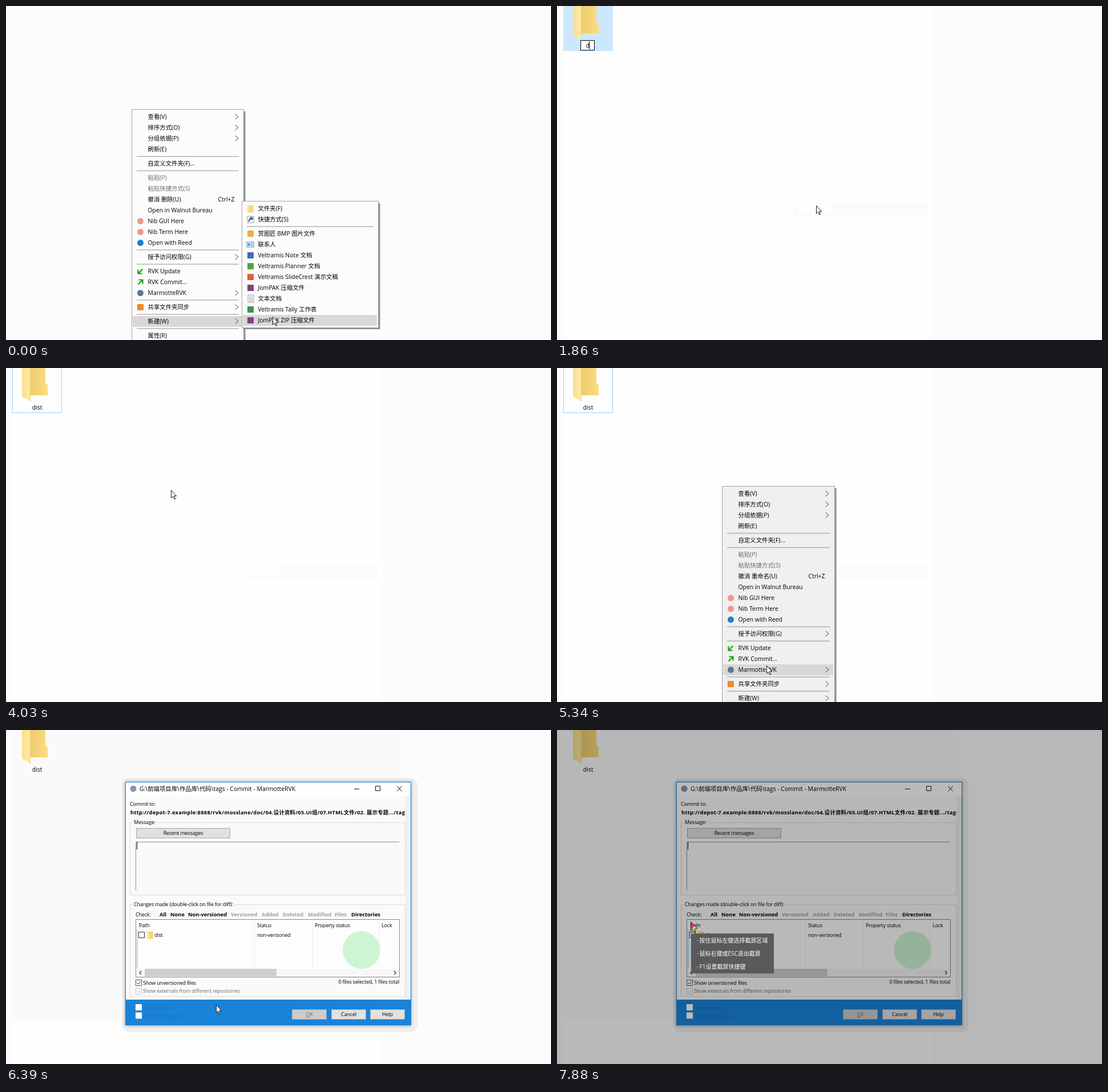
Recreate the animation shown at these times as an HTML page. Size 955x586 px, loop 8 s.

```html
<!DOCTYPE html>
<html lang="zh-CN">
<head>
<meta charset="utf-8">
<title>Folder commit</title>
<style>
  html, body { margin: 0; width: 100%; height: 100%; overflow: hidden; background: #fcfcfc; }
  svg { display: block; width: 955px; height: 586px; }
  text { font: 10.4px 'Open Sans', 'Noto Sans CJK SC', 'Noto Sans CJK', sans-serif; fill: #000; white-space: pre; }
  .ui { font-size: 9px; letter-spacing: -.17px; }
  .bold { font-size: 9.3px; font-weight: 700; }
  .url { letter-spacing: .3px; }
  .off { fill: #6d6d6d; }
  .pale { fill: #a0a0a0; }
  .tip { font-size: 10px; fill: #fff; }
  .mid { text-anchor: middle; }
  .end { text-anchor: end; }
</style>
</head>
<body>
<svg id="stage" viewBox="0 0 955 586"></svg>
<script>
const LOOP = 8000;

// ---- drawing helpers ----
const rect = (x, y, w, h, fill, more = '') =>
  `<rect x="${x}" y="${y}" width="${w}" height="${h}" fill="${fill}" ${more}/>`;
const frame = (x, y, w, h, stroke, fill = 'none', more = '') =>
  rect(x + .5, y + .5, w - 1, h - 1, fill, `stroke="${stroke}" ${more}`);
const path = (d, stroke, fill = 'none', more = '') =>
  `<path d="${d}" stroke="${stroke}" fill="${fill}" ${more}/>`;
const text = (x, y, s, cls = '', more = '') =>
  `<text x="${x}" y="${y + (/ui|bold|tip/.test(cls) ? 3.3 : 3.7)}" class="${cls}" ${more}>${s}</text>`;
const group = (id, body, more = '') => `<g id="${id}" ${more}>${body}</g>`;

const glyphs = {
  update: (x, y) => path(`M${x + 4} ${y - 4}L${x - 3} ${y + 3}M${x - 4} ${y - 3}V${y + 4}H${x + 3}`, '#1f9a12', 'none', 'stroke-width="2.2"'),
  commit: (x, y) => path(`M${x - 4} ${y + 4}L${x + 3} ${y - 3}M${x - 3} ${y - 4}H${x + 4}V${y + 3}`, '#1f9a12', 'none', 'stroke-width="2.2"'),
  folder: (x, y) => rect(x - 6, y - 6, 11, 13, '#f7d77c') + rect(x - 6, y - 6, 3, 13, '#ffe9a6'),
  link: (x, y) => frame(x - 6, y - 6, 12, 12, '#9a9a9a', '#fff') +
    path(`M${x - 3} ${y + 4}Q${x - 3} ${y - 1} ${x + 2} ${y - 1}M${x - 1} ${y - 3}H${x + 3}V${y + 1}`, '#1d4f9c', 'none', 'stroke-width="1.8"'),
  card: (x, y) => frame(x - 7, y - 5, 13, 10, '#5a8fc4', '#e6f2fc') + rect(x - 5, y - 2, 4, 4, '#4d8ac6') +
    rect(x, y - 2, 4, 1, '#4d8ac6') + rect(x, y + 1, 4, 1, '#4d8ac6'),
  page: (x, y) => frame(x - 5, y - 7, 11, 14, '#9a9a9a', '#fff') +
    [-4, -2, 0, 2, 4].map(d => rect(x - 3, y + d, 7, 1, '#b0b0b0')).join('')
};
const icon = (name, x, y) => {
  if (!name) return '';
  if (glyphs[name]) return glyphs[name](x, y);
  const color = name.slice(1);
  return name[0] === 'o' ? `<circle cx="${x}" cy="${y}" r="5.5" fill="${color}"/>` : rect(x - 5.5, y - 5.5, 11, 11, color);
};

// Rows are [label, icon, mark]; mark is '>' for a submenu, '-' for disabled, else a shortcut. 0 is a rule.
function menu(id, x, y, w, h, bg, rows) {
  let top = y + 4, body = '';
  for (const row of rows) {
    if (!row) {
      body += rect(x + 9, top + 2.5, w - 18, 1, '#919191');
      top += 6;
      continue;
    }
    const [label, pic, mark] = row, mid = top + 9.5;
    body += icon(pic, x + 15.5, mid) + text(x + 28.5, mid, label, mark === '-' ? 'off' : '');
    if (mark === '>') body += path(`M${x + 181.5} ${mid - 5}l5.5 4.7l-5.5 4.7`, '#40406c');
    else if (mark && mark !== '-') body += text(x + 180.5, mid, mark, 'end');
    top += 19;
  }
  return group(id, rect(x + 2.5, y + 4, w, h - 2, '#8f8f8f') + frame(x, y, w, h, '#a3a3a3', bg) +
    rect(x + 2, 0, w - 5, 19, '#d8d8d8', `id="${id}Hover"`) + body);
}

const mainRows = undone => [
  ['查看(V)', '', '>'], ['排序方式(O)', '', '>'], ['分组依据(P)', '', '>'], ['刷新(E)'], 0,
  ['自定义文件夹(F)...'], 0,
  ['粘贴(P)', '', '-'], ['粘贴快捷方式(S)', '', '-'], [`撤消 ${undone}(U)`, '', 'Ctrl+Z'],
  ['Open in Walnut Bureau'], ['Nib GUI Here', 'o#ee9a86'], ['Nib Term Here', 'o#ee9a86'],
  ['Open with Reed', 'o#1f7ec8'], 0,
  ['授予访问权限(G)', '', '>'], 0,
  ['RVK Update', 'update'], ['RVK Commit...', 'commit'], ['MarmotteRVK', 'o#5d7896', '>'], 0,
  ['共享文件夹同步', 's#ee8a32', '>'], 0, ['新建(W)', '', '>'], 0, ['属性(R)']
];
const newRows = [
  ['文件夹(F)', 'folder'], ['快捷方式(S)', 'link'], 0,
  ['赏图匠 BMP 图片文件', 's#eeb045'], ['联系人', 'card'],
  ['Veltramis Note 文档', 's#3f6fb5'], ['Veltramis Planner 文档', 's#56a046'],
  ['Veltramis SlideCrest 演示文稿', 's#dc6239'], ['JomPAK 压缩文件', 's#85407e'],
  ['文本文档', 'page'], ['Veltramis Tally 工作表', 's#3f9155'], ['JomPAK ZIP 压缩文件', 's#85407e']
];

const folder = () =>
  rect(11, -2, 87, 81, '#cce8ff', 'id="fill"') + frame(11, -2, 87, 81, '#99d1ff', 'none', 'id="outline"') +
  path('M40 0H69V27L73 30V48H40Z', 'none', 'url(#body)') + path('M28 0H41L43 4V59L28 50Z', 'none', 'url(#flap)') +
  text(54.5, 69, 'dist', 'mid', 'id="label"') +
  group('edit', frame(20, 60, 68, 18, '#000', '#fff', 'id="editBox"') + rect(28, 62, 52, 14, '#0078d7', 'id="editSel"') +
    text(54, 69, '', 'mid', 'id="editText"') + rect(79, 62, 1, 14, '#000', 'id="caret"'));

// ---- commit window ----
const groupBox = (y, h, label, w) => frame(217, y, 483, h, '#dcdcdc') + rect(222, y - 1, w, 3, '#fafafa') + text(224, y, label, 'ui');
const check = (x, y, stroke, tick) => frame(x, y, 11, 11, stroke, '#fff') +
  (tick ? path(`M${x + 2.5} ${y + 5.5}l2.3 2.5l4.2 -5`, tick) : '');
const button = (x, y, w, h, label, fill = '#e1e1e1', cls = '') =>
  frame(x, y, w, h, '#a8a8a8', fill) + text(x + w / 2, y + h / 2, label, 'ui mid ' + cls);

function commitWindow() {
  const filters = [[269, 'All'], [288, 'None'], [319, 'Non-versioned'], [394, 'Versioned', 1], [448, 'Added', 1],
    [485, 'Deleted', 1], [529, 'Modified', 1], [576, 'Files', 1], [605, 'Directories']];
  return rect(203, 84, 518, 446, '#efefef', 'rx="13"') + rect(209, 91, 501, 428, '#999', 'filter="url(#soft)"') +
    frame(209, 91, 501, 427, '#1883d7', '#fafafa') + rect(210, 92, 499, 24, '#fff') +
    rect(700, 116, 9, 357, '#f0f0f0') + rect(209, 473, 501, 45, '#1883d9') +
    '<circle cx="223" cy="103" r="5.5" fill="#8295b4"/>' +
    text(234, 103, 'G:\\前端项目库\\作品库\\代码\\tags - Commit - MarmotteRVK') +
    path('M610 103.5h9M647.5 98.5h8v8h-8zM685.5 98.5l8 9M693.5 98.5l-8 9', '#111') +
    text(217, 130, 'Commit to:', 'ui') +
    `<g clip-path="url(#urlClip)">${text(218, 145, 'http://depot-7.example:8888/rvk/mosslane/doc/04.设计资料/05.UI组/07.HTML文件/02. 展示专题.../tags', 'bold url')}</g>` +
    groupBox(162, 128, 'Message:', 42) + button(228, 172, 165, 18, 'Recent messages') +
    group('ghosts', rect(229, 196, 206, 86, '#fff') + rect(227, 282, 208, 38, '#f0f0f0')) +
    path('M227.5 281V196.5H689', '#8c8c8c') + rect(229, 196.5, 1, 13, '#000', 'id="msgCaret"') +
    groupBox(306, 162, 'Changes made (double-click on file for diff):', 177) + text(227, 324, 'Check:', 'ui') +
    filters.map(([x, s, off]) => text(x, 324, s, off ? 'bold pale' : 'bold')).join('') +
    frame(227, 332, 463, 102, '#828790', '#fdfdfd') + rect(228, 333, 207, 17, '#e5f3ff', 'id="headHover"') +
    [435, 536, 653].map(x => rect(x, 333, 1, 85, '#e3f1f0')).join('') + rect(229.5, 350, 1, 68, '#75b9e8') +
    '<circle cx="623" cy="386" r="33" fill="#cdf4d4"/>' +
    [[233, 'Path'], [440, 'Status'], [541, 'Property status'], [658, 'Lock']].map(([x, s]) => text(x, 343, s, 'ui')).join('') +
    check(232, 354, '#333') + glyphs.folder(253, 359.5) + text(260, 360, 'dist', 'ui') + text(440, 360, 'non-versioned', 'ui') +
    rect(228, 419, 461, 14, '#f7f7f7') + rect(243, 419, 231, 13, '#cdcdcd') +
    path('M237 422.5l-3 3.2l3 3.2M680 422.5l3 3.2l-3 3.2', '#444', 'none', 'stroke-width="1.4"') +
    check(227, 438, '#555', '#222') + frame(227, 438, 11, 11, '#0078d7', 'none', 'id="checkHover"') +
    text(240, 444, 'Show unversioned files', 'ui') + text(689, 442, '0 files selected, 1 files total', 'ui end') +
    check(227, 453, '#c4c4c4', '#aaa') + text(240, 458, 'Show externals from different repositories', 'ui off') +
    rect(227, 481, 11, 11, '#fff') + rect(227, 495.5, 11, 11, '#fff') +
    text(244, 487, 'Keep locks', 'ui', 'style="fill:#2a6fa8"') + text(244, 502, 'Keep changelists', 'ui', 'style="fill:#2a6fa8"') +
    button(501, 490, 61, 18, '<tspan text-decoration="underline">O</tspan>K', '#cccccc', 'off') +
    button(570, 490, 61, 18, 'Cancel') + button(638, 490, 61, 18, 'Help');
}

const arrow = 'M.5 .5V14L3.6 11.2L5.8 16.3L7.8 15.4L5.6 10.5H9.7Z';
const tips = ['按住鼠标左键选择截屏区域', '鼠标右键或ESC退出截屏', 'F1设置截屏快捷键'];

document.getElementById('stage').innerHTML = `<defs>
  <linearGradient id="body"><stop stop-color="#eccb6c"/><stop offset="1" stop-color="#fbdc80"/></linearGradient>
  <linearGradient id="flap"><stop stop-color="#f9df8c"/><stop offset=".8" stop-color="#ffe9a2"/><stop offset="1" stop-color="#f6d67c"/></linearGradient>
  <linearGradient id="rainbow" x2=".8" y2="1"><stop offset=".3" stop-color="#f0208c"/><stop offset=".3" stop-color="#e020e0"/>
    <stop offset=".5" stop-color="#e020e0"/><stop offset=".5" stop-color="#ffee20"/><stop offset=".75" stop-color="#ffee20"/><stop offset=".75" stop-color="#30d060"/></linearGradient>
  <filter id="soft"><feGaussianBlur stdDeviation="2.5"/></filter>
  <clipPath id="urlClip"><rect x="217" y="136" width="483" height="20"/></clipPath></defs>` +
  rect(0, 0, 955, 586, '#fcfcfc') +
  group('paper', rect(11, 0, 646, 586, '#fefefe')) +
  group('trace', rect(415, 346, 235, 25, '#fbfbfb') + rect(423, 348, 58, 15, '#fefefe', 'id="notch"')) +
  group('backdrop', rect(11, 0, 689, 508, '#fafafa')) +
  group('folder', folder()) +
  menu('first', 220, 181, 197, 420, '#fcfcfc', mainRows('删除')) +
  menu('sub', 413, 342, 240, 223, '#fcfcfc', newRows) +
  menu('second', 289, 207, 198, 420, '#f0f0f0', mainRows('重命名')) +
  group('window', commitWindow()) +
  group('dim', rect(0, 0, 955, 586, '#000', 'opacity=".27"') + rect(235, 357, 145, 70, '#5a5a5a') +
    tips.map((s, i) => text(245, 370 + i * 23, '·', 'tip') + text(249.5, 370 + i * 23, s, 'tip')).join('') +
    path(arrow, '#222', 'url(#rainbow)', 'transform="translate(234 336) scale(1.2)" stroke-width=".7"')) +
  group('pointer', path(arrow, '#1a1a28', '#fff', 'stroke-linejoin="round"')) +
  group('resizer', path('M233.5 331V343M236.5 331V343', '#000') +
    path('M228 337l4 -3v2.3h1v1.4h-1v2.3zM242 337l-4 -3v2.3h-1v1.4h1v2.3z', 'none', '#000'));

// ---- timeline: each key holds until the next ----
const keys = {
  pointer: [[0, 467, 545], [150, 466, 510], [270, 462, 441], [420, 460, 400], [540, 456, 372], [660, 454, 350],
    [3610, 290, 224], [3760, 264, 191], [3880, 276, 203], [4030, 289, 214], [4710, 300, 242], [4830, 322, 322],
    [4950, 345, 402], [5070, 360, 462], [5220, 365, 504], [5340, 367, 522], [5460, 367, 521], [5580, 367, 511],
    [5730, 367, 510], [6120, 368, 496], [6270, 368, 482], [6540, 300, 440], [6690, 258, 300], [6810, 262, 350],
    [6930, 277, 388], [7080, 242, 387], [7350, 236, 370]],
  subHover: [[0, 542], [150, 504], [270, 447], [420, 390], [540, 365], [660, 346]],
  secondHover: [[0, -30], [4710, 230], [4830, 318], [4950, 394], [5070, 458], [5220, 501], [5340, 520], [5580, 501]],
  // text, box x, box width, caret x (0 = off)
  edit: [[0, '', 20, 68, 0], [1180, '新建文件夹', 20, 68, 79], [1580, '新建文件夹', 20, 68, 0], [1860, 'd', 41, 25, 56],
    [2420, 'd', 41, 25, 0], [2570, 'dis', 38, 31, 61], [2690, 'dist', 36, 36, 63], [3190, 'dist', 36, 36, 0],
    [3310, 'dist', 36, 36, 63], [3460, '', 36, 36, 0]],
  firstAlpha: [[0, 1], [940, .4], [1060, 0]],
  secondAlpha: [[0, 0], [4590, .6], [4710, 1], [5880, .5], [6000, 0]],
  windowAlpha: [[0, 0], [6270, .5], [6390, 1]]
};
const spans = {
  paper: [1060, LOOP], trace: [1180, 6270], backdrop: [6270, LOOP], folder: [1060, LOOP], fill: [1060, 4030],
  outline: [3460, 6270], label: [3460, LOOP], edit: [1180, 3460], editSel: [1180, 1860],
  ghosts: [7760, 7880], headHover: [7610, 7760], checkHover: [6540, 6690], resizer: [7610, 7880], dim: [7880, LOOP]
};
const hidden = { pointer: [[2420, 2690], [3190, 3310], [7610, LOOP]], msgCaret: [[6690, 6930]] };

const el = id => document.getElementById(id);
const within = (t, [a, b]) => t >= a && t < b;
const show = (id, on) => { el(id).style.display = on ? '' : 'none'; };
const at = (name, t) => keys[name].filter(k => k[0] <= t).pop().slice(1);
const set = (id, name, value) => el(id).setAttribute(name, value);

set('firstHover', 'y', 544);

function draw(t) {
  for (const id in spans) show(id, within(t, spans[id]));
  for (const id in hidden) show(id, !hidden[id].some(span => within(t, span)));
  set('pointer', 'transform', `translate(${at('pointer', t)})`);
  set('subHover', 'y', at('subHover', t)[0]);
  set('secondHover', 'y', at('secondHover', t)[0]);
  set('first', 'opacity', at('firstAlpha', t)[0]);
  set('sub', 'opacity', at('firstAlpha', t)[0]);
  set('second', 'opacity', at('secondAlpha', t)[0]);
  set('window', 'opacity', at('windowAlpha', t)[0]);
  set('notch', 'x', t < 3610 ? 423 : 415);
  set('notch', 'width', t < 3610 ? 58 : 66);

  const [word, x, w, caret] = at('edit', t);
  el('editText').textContent = word;
  el('editText').style.fill = t < 1860 ? '#fff' : '#000';
  set('editBox', 'x', x + .5);
  set('editBox', 'width', w - 1);
  set('caret', 'x', caret);
  show('caret', caret > 0);
}

function tick() {
  draw(performance.now() % LOOP);
  requestAnimationFrame(tick);
}
tick();
</script>
</body>
</html>
```
